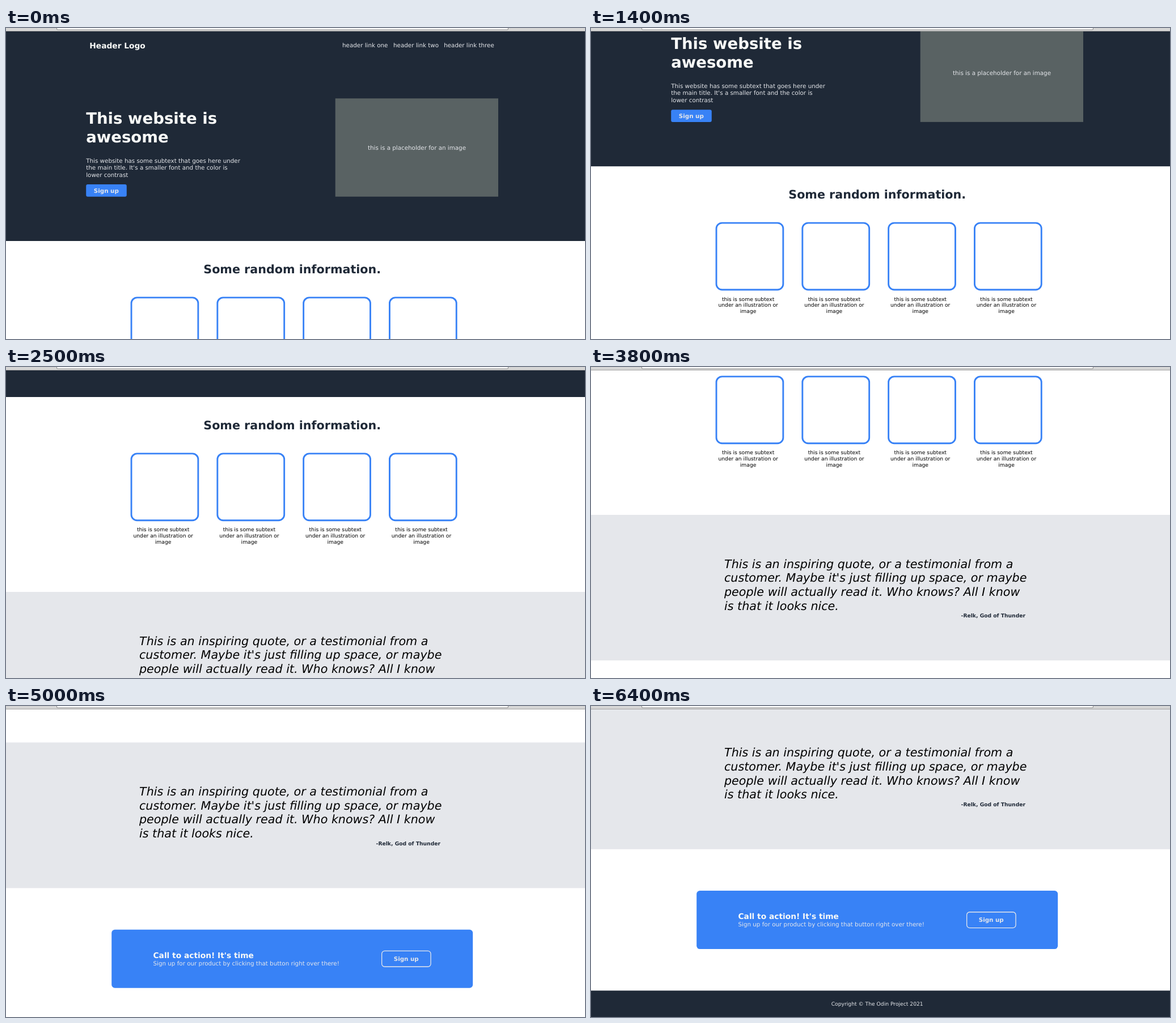
Animation of 1021x549 px, one loop 6.5 s. Source, as an HTML page with a canvas:

```html
<!DOCTYPE html>
<html lang="en">
<head>
<meta charset="utf-8">
<title>Landing page scroll</title>
<style>
  html, body { margin: 0; width: 100%; height: 100%; overflow: hidden; background: #fff; }
  canvas { display: block; }
</style>
</head>
<body>
<canvas id="stage" width="1021" height="549"></canvas>
<script>
const W = 1021, H = 549, LOOP = 6500, TOP = 6;
const ZOOM = 0.5745; // browser zoom applied to CSS pixel sizes
const DARK = '#1f2937', BLUE = '#3882f6', PALE = '#e5e7eb', LIGHT = '#f9faf8';

const ctx = document.getElementById('stage').getContext('2d');

// [time in ms, scroll offset]; each offset holds until the next
const SCROLL = [
  [0, 0], [500, 22], [600, 55], [700, 68],
  [1100, 103], [1200, 122],
  [1400, 131.8], [1500, 136], [1600, 138],
  [2000, 200], [2100, 238], [2200, 255],
  [2400, 300], [2500, 323],
  [3100, 391], [3800, 459], [4100, 491], [4300, 524], [4500, 546],
  [4800, 593], [5000, 655.6], [5300, 699], [5600, 713], [5900, 724.2]
];

function scrollAt(t) {
  let y = 0;
  for (const [start, offset] of SCROLL) if (t >= start) y = offset;
  return y;
}

function rect(x, y, w, h, color) {
  ctx.fillStyle = color;
  ctx.fillRect(x, y, w, h);
}

function roundRect(x, y, w, h, r) {
  ctx.beginPath();
  ctx.roundRect(x, y, w, h, r);
}

function fillRound(x, y, w, h, r, color) {
  roundRect(x, y, w, h, r);
  ctx.fillStyle = color;
  ctx.fill();
}

// The border lies inside the given box
function border(x, y, w, h, r, line, color) {
  const d = line / 2;
  roundRect(x + d, y + d, w - line, h - line, r - d);
  ctx.lineWidth = line;
  ctx.strokeStyle = color;
  ctx.stroke();
}

function text(str, x, y, size, color, style = '', align = 'left') {
  ctx.font = `${style} ${size * ZOOM}px "DejaVu Sans", sans-serif`;
  ctx.textAlign = align;
  ctx.fillStyle = color;
  ctx.fillText(str, x, y);
}

function lines(list, x, y, step, ...rest) {
  list.forEach((str, i) => text(str, x, y + i * step, ...rest));
}

function hero() {
  rect(0, 0, W, 376, DARK);
  text('Header Logo', 147.3, 35.5, 24, LIGHT, 'bold');
  text('header link one', 593, 34, 18, PALE);
  text('header link two', 683, 34, 18, PALE);
  text('header link three', 772.2, 34, 18, PALE);

  lines(['This website is', 'awesome'], 141.2, 169, 33.2, 48, LIGHT, 'bold');
  lines([
    'This website has some subtext that goes here under',
    "the main title. It's a smaller font and the color is",
    'lower contrast'
  ], 141.2, 237.6, 12.64, 18, PALE);

  fillRound(141.2, 276, 71.6, 21.8, 3, BLUE);
  text('Sign up', 154.8, 290.5, 18, PALE, 'bold');

  rect(580.7, 124.3, 287.3, 173.4, '#596263');
  text('this is a placeholder for an image', 724.5, 214.7, 18, PALE, '', 'center');
}

function cards() {
  text('Some random information.', 504.7, 432.9, 36, DARK, 'bold', 'center');
  for (let i = 0; i < 4; i++) {
    const x = 219.6 + i * 151.8;
    border(x, 474.5, 120.7, 120.7, 11.5, 2.87, BLUE);
    lines(['this is some subtext', 'under an illustration or', 'image'],
      x + 57.5, 613.3, 10.95, 16, '#000', '', 'center');
  }
}

function quote() {
  rect(0, 720, W, 257, PALE);
  lines([
    'This is an inspiring quote, or a testimonial from a',
    "customer. Maybe it's just filling up space, or maybe",
    'people will actually read it. Who knows? All I know',
    'is that it looks nice.'
  ], 235, 813.5, 24.7, 36, '#000', 'italic');
  text('-Relk, God of Thunder', 766, 901.4, 16, DARK, 'bold', 'right');
}

function callToAction() {
  fillRound(186.2, 1050.3, 637, 103, 5.75, BLUE);
  text("Call to action! It's time", 259.5, 1100.3, 24, LIGHT, 'bold');
  text('Sign up for our product by clicking that button right over there!',
    259.5, 1113.6, 18, PALE);
  border(662, 1087.3, 87.7, 29.2, 5.75, 1.3, PALE);
  text('Sign up', 683.7, 1105.5, 18, PALE, 'bold');
}

function footer() {
  rect(0, 1226.6, W, 50, DARK);
  text('Copyright © The Odin Project 2021', 504.7, 1253.5, 16, PALE, '', 'center');
}

function toolbar() {
  rect(0, 0, W, TOP, '#d6d6d6');
  rect(0, TOP - 1, W, 1, '#a3a3a3');
  fillRound(89, -8, 797, 11.5, 2, '#8e8e8e');
  fillRound(90, -8, 795, 10.5, 1.5, '#fff');
}

function draw() {
  const t = performance.now() % LOOP;
  rect(0, 0, W, H, '#fff');
  ctx.textRendering = 'geometricPrecision';
  ctx.save();
  ctx.translate(0, -scrollAt(t));
  [hero, cards, quote, callToAction, footer].forEach(part => part());
  ctx.restore();
  toolbar();
  requestAnimationFrame(draw);
}

draw();
</script>
</body>
</html>
```
